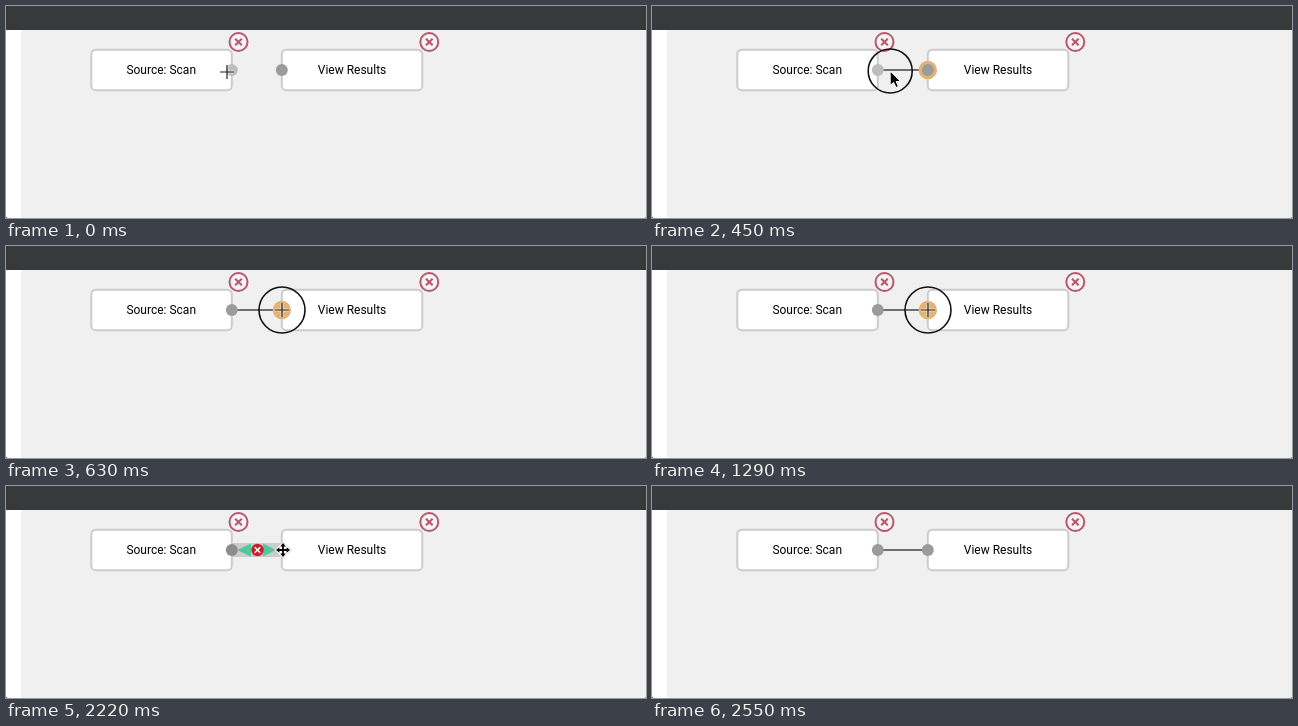
Animation, 640 px wide and 212 px high, one loop 2850 ms. Source, as an HTML page:

```html
<!DOCTYPE html>
<html lang="en">
<head>
<meta charset="utf-8">
<title>Connecting two nodes</title>
<style>
  html, body { margin: 0; width: 100%; height: 100%; overflow: hidden; background: #38393b; }
  svg { display: block; width: 640px; height: 212px; }
  text { font: 12px Roboto, sans-serif; text-anchor: middle; }
</style>
</head>
<body>
<svg viewBox="0 0 640 212">
  <defs>
    <g id="close">
      <circle r="9" fill="#f6f1f2" stroke="#b3586f" stroke-width="2"/>
      <path d="M-3.3-3.3 3.3 3.3M3.3-3.3-3.3 3.3" stroke="#b3586f" stroke-width="2"/>
    </g>
    <rect id="node" width="140.5" height="40.5" rx="4.5" fill="#fff" stroke="#ccc" stroke-width="2"/>
    <path id="plus" d="M-7 0H7M0-7V7"/>
  </defs>

  <path d="M0 24H640V210Q640 212 638 212H2Q0 212 0 210Z" fill="#fff"/>
  <path d="M15 24H640V210Q640 212 638 212H15Z" fill="#f0f0f0"/>

  <use href="#node" x="85.3" y="43.7"/>
  <use href="#node" x="275.8" y="43.7"/>
  <text x="155.2" y="68">Source: Scan</text>
  <text x="346" y="68">View Results</text>
  <use href="#close" x="232.5" y="36"/>
  <use href="#close" x="423.3" y="36"/>

  <path id="wire" stroke="#444" stroke-width="1.3"/>
  <path id="band" d="M226 64H277" stroke="#ccc" stroke-width="14"/>
  <circle id="halo" cx="275.8" cy="64" r="9.2" fill="#e4b272"/>
  <circle id="start" cx="225.8" cy="64" r="6"/>
  <circle id="end" cx="275.8" cy="64" r="6" fill="#9b9b9b"/>
  <g id="link">
    <path d="M231 64 245 57.5V70.5ZM270 64 257 57.5V70.5Z" fill="#50c8a0"/>
    <circle cx="251.5" cy="64" r="6.2" fill="#c4202b"/>
    <path d="M248.8 61.3l5.4 5.4m0-5.4l-5.4 5.4" stroke="#fff" stroke-width="1.6"/>
  </g>

  <g id="pointer">
    <circle id="ring" fill="none" stroke="#111" stroke-width="1.6"/>
    <g id="cross">
      <use href="#plus" stroke="#fff" stroke-opacity=".55" stroke-width="3"/>
      <use href="#plus" stroke="#222" stroke-width="1.2"/>
    </g>
    <path id="arrow" d="M0 0V14.5L3.4 11.4 5.8 16.5 8.2 15.4 5.9 10.5H10.3Z" fill="#000" stroke="#fff"/>
    <g id="move">
      <path d="M0-8.5 8.5 0 0 8.5-8.5 0Z" fill="#fff" stroke="#bbb" stroke-width=".6"/>
      <path d="M-5 0H5M0-5V5" stroke="#000" stroke-width="1.8"/>
      <path d="M0-7 2.8-3.6H-2.8ZM0 7 2.8 3.6H-2.8ZM-7 0-3.6-2.8V2.8ZM7 0 3.6-2.8V2.8Z"/>
    </g>
  </g>
</svg>
<script>
const LOOP = 2850;
const el = id => document.getElementById(id);
const show = (id, on) => el(id).setAttribute("opacity", Number(on));
const clamp = v => Math.min(1, Math.max(0, v));

// Piecewise linear value through [time, value] points
function track(t, points) {
  let value = points[0][1];
  for (let i = 1; i < points.length; i++) {
    const [t0, a] = points[i - 1], [t1, b] = points[i];
    if (t >= t0) value = a + (b - a) * clamp((t - t0) / (t1 - t0));
  }
  return value;
}

function draw(t) {
  const between = (a, b) => t >= a && t < b;
  const dragging = between(300, 1350);
  const hovered = between(1410, 2400);
  const leave = clamp((t - 2300) / 250) ** 2;

  const x = track(t, [[30, 221], [240, 226], [330, 228], [450, 238], [540, 256], [630, 276], [1380, 276], [1440, 277]]) + 62 * leave;
  const y = track(t, [[30, 66], [240, 64.5], [450, 65], [630, 64]]) + 152 * leave;
  el("pointer").setAttribute("transform", `translate(${x} ${y})`);

  show("cross", t < 300 || between(570, 1410));
  show("arrow", between(300, 570) || between(2370, 2550));
  show("move", between(1410, 2370));

  el("ring").setAttribute("r", track(t, [[210, 14], [300, 22], [450, 22], [600, 23], [1290, 23], [1440, 17]]));
  show("ring", track(t, [[210, 0], [300, 1], [1290, 1], [1440, 0]]));

  const wireEnd = track(t, [[300, 228], [420, 276]]);
  el("wire").setAttribute("d", `M226 64H${wireEnd}`);
  show("wire", t >= 300 && !hovered);
  show("halo", dragging);
  show("end", t < 570 || t >= 1350 && !hovered);
  el("start").setAttribute("fill", t < 540 ? "#bdbdbd" : hovered ? "#8c8c8c" : "#9b9b9b");
  show("band", hovered);
  show("link", hovered);
}

function tick() {
  draw(performance.now() % LOOP);
  requestAnimationFrame(tick);
}
tick();
</script>
</body>
</html>
```
